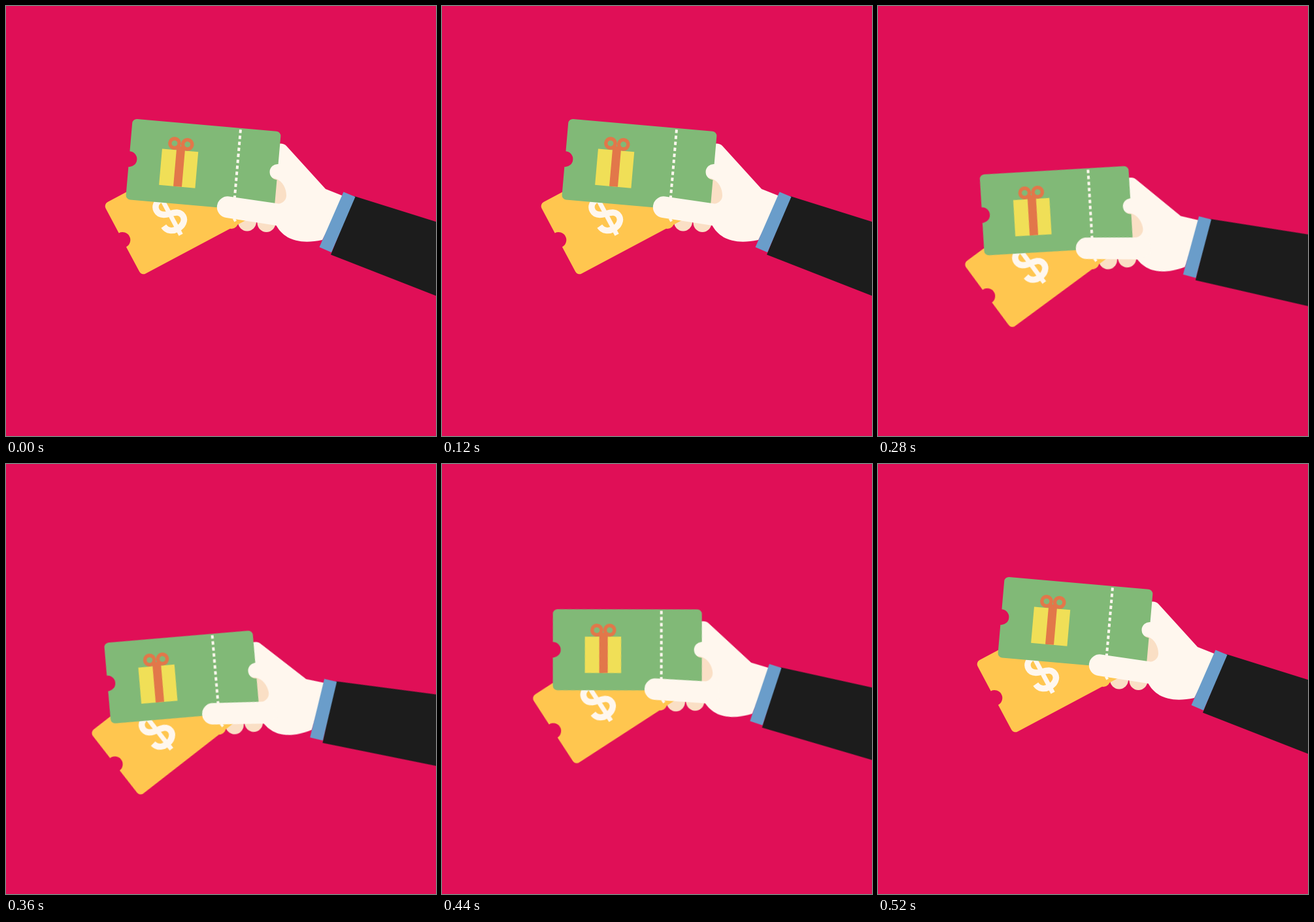
Write an HTML page without scripts that moves like this. It is 658 px wide and 658 px high and loops after 560 ms.

```html
<!DOCTYPE html>
<html lang="en">
<head>
<meta charset="utf-8">
<title>Hand waving tickets</title>
<style>
  html, body { margin: 0; height: 100%; overflow: hidden; background: #e00f57; }
  svg { display: block; width: 100vw; height: 100vh; }
  .skin { fill: #fff7ee; }
  .shade { fill: #fadfc5; }
  .gold { color: #ffc64f; }
  .green { color: #81b977; }
  .perforation { stroke: #fff7ee; stroke-width: 4; stroke-dasharray: 5.2 4; }
  .dollar { fill: none; stroke: #fff7ee; stroke-width: 9.5; }
  .box { fill: #f0df57; }
  .ribbon { fill: #e2774a; }
  .bow { fill: none; stroke: #e2774a; stroke-width: 5.4; }

  /* The arm swings around an elbow off stage, at an even pace in 40 ms steps */
  .arm {
    transform-origin: 758px 476px;
    animation: swing 560ms step-end infinite;
  }
  @keyframes swing {
    0%, 92.85%, 100% { transform: rotate(0deg); }
    7.14% { transform: rotate(1.2deg); }
    21.42% { transform: rotate(0deg); animation-timing-function: steps(5); }
    57.14% { transform: rotate(-10.5deg); }
    64.28% { transform: rotate(-9.9deg); animation-timing-function: steps(4); }
  }
</style>
</head>
<body>
<svg viewBox="0 0 658 658">
  <defs>
    <g id="ticket">
      <path fill="currentColor" d="M7 0H221a7 7 0 0 1 7 7V50a12 12 0 0 0 0 24V117a7 7 0 0 1-7 7H7a7 7 0 0 1-7-7V74a12 12 0 0 0 0-24V7a7 7 0 0 1 7-7z"/>
      <path class="perforation" d="M166 2.4V122"/>
    </g>
  </defs>

  <g class="arm">
    <g class="shade">
      <ellipse cx="369" cy="330" rx="14" ry="14.5"/>
      <ellipse cx="398.5" cy="331.5" rx="14" ry="14.5"/>
    </g>
    <path class="skin" d="M396 212L420 210.5Q426 210.5 429 214L489 280L518 291.5L484 358C445 366 424 355 413 335L396 300z"/>
    <path class="shade" d="M400 261L412 264C424 268 429 280 429 290C429 298 422 303 412 304H400z"/>

    <g class="gold">
      <circle fill="currentColor" cx="345" cy="331" r="10"/>
      <g transform="translate(149.2 303.3) rotate(-28)">
        <use href="#ticket"/>
        <g class="dollar" transform="translate(1.5 -1)">
          <path d="M64 74C65 83 72 87.5 81 87.5S97.5 82 97.5 74.500C97.5 66 90 63.5 81 61.5S65.5 56 65.5 48S72 35.5 81 35.5S96 40 97 48"/>
          <path stroke-width="7" d="M81 24V98"/>
        </g>
      </g>
    </g>

    <g class="green" transform="translate(193.8 172.4) rotate(5)">
      <use href="#ticket"/>
      <rect class="box" x="49" y="42" width="55.5" height="55.5"/>
      <rect class="ribbon" x="71" y="36" width="13" height="61.5"/>
      <g class="bow">
        <circle cx="67.2" cy="32" r="7.2"/>
        <circle cx="87" cy="32" r="7.2"/>
      </g>
    </g>

    <path class="skin" d="M417 302.5L341.5 291.5A16.4 16.4 0 0 0 337 324L414 336L436 330V304z"/>
    <path fill="#1c1c1c" d="M533 291L900 406V538L497 380.5z"/>
    <path fill="#6a9dca" d="M516.5 284.5L534.5 292L498 377L479.500 369z"/>
  </g>
</svg>
</body>
</html>
```
